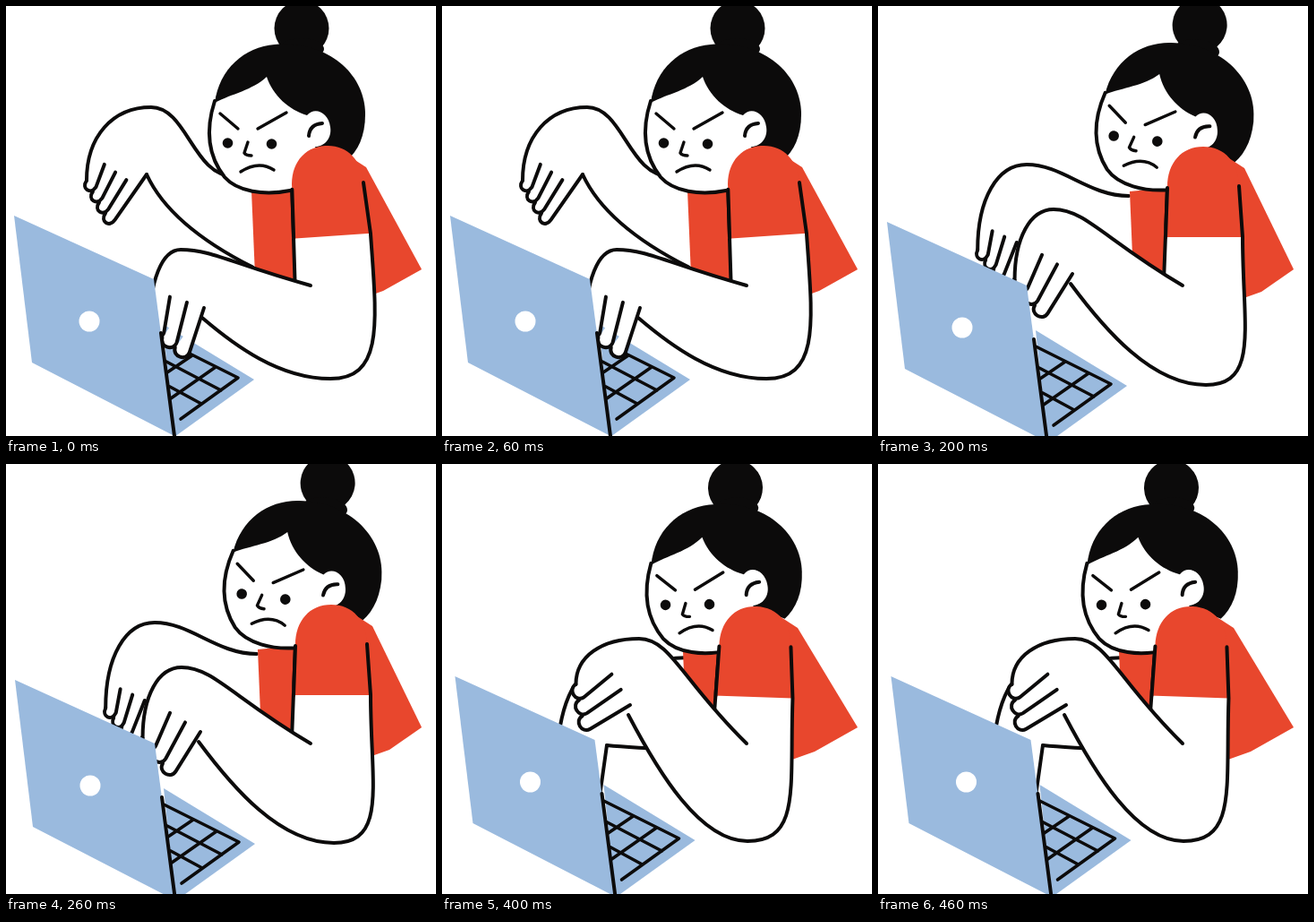
These frames come from a looping animation (480x480 px, 0.5 s). An HTML page with a canvas:

```html
<!DOCTYPE html>
<html lang="en">
<head>
<meta charset="utf-8">
<title>Angry typing</title>
<style>
html, body { margin: 0; width: 100%; height: 100%; overflow: hidden; background: #fff; }
canvas { display: block; width: 480px; height: 480px; }
</style>
</head>
<body>
<canvas id="stage" width="480" height="480"></canvas>
<script>
const ctx = document.getElementById('stage').getContext('2d');
const INK = '#0c0b0b', RED = '#e8472d', BLUE = '#9abade', WHITE = '#fff';
const STEP = 100;

// Joints of the figure; angles in degrees.
// wrist: top of the bent wrist, knuckle: base of the outer finger, aim: where fingers point.
const poses = [
  { laptop: [-4, -1], head: [271.5, 153.5], tilt: 0, bun: 0, shoulder: [356, 156], swing: -4, elbow: [362, 416],
    near: { wrist: [195, 272], knuckle: [221, 337], aim: 108 },
    far: { wrist: [162, 113], knuckle: [157, 188], aim: 125, root: [254, 190] } },
  { laptop: [0, 0], head: [278, 151], tilt: 0, bun: 0, shoulder: [359, 153], swing: -4, elbow: [372, 418],
    near: { wrist: [200, 251], knuckle: [219, 320], aim: 121 },
    far: { wrist: [166, 140], knuckle: [165, 214], aim: 120, root: [262, 198] } },
  { laptop: [-3, 6], head: [287, 148], tilt: 6, bun: -5, shoulder: [363, 157], swing: 0, elbow: [366, 423],
    near: { wrist: [196, 227], knuckle: [217, 299], aim: 122 },
    far: { wrist: [166, 177], knuckle: [176, 254], aim: 115, root: [280, 212] } },
  { laptop: [0, 2], head: [291.5, 145.5], tilt: 7.5, bun: 7, shoulder: [363, 157], swing: 6.5, elbow: [337, 415],
    near: { wrist: [219, 185], knuckle: [220, 260], aim: 142 },
    far: { wrist: [172, 216], knuckle: [184, 288], aim: 102, root: [290, 200] } },
  { laptop: [1.5, 2], head: [273.5, 157], tilt: -2, bun: 0, shoulder: [351, 159], swing: 2, elbow: [341, 421],
    near: { wrist: [220, 195], knuckle: [210, 269], aim: 149 },
    far: { wrist: [168, 235], knuckle: [184, 314], aim: 98, root: [276, 216] } }
];

const NEAR_HAND = { count: 3, gap: 20, inset: 0, reach: 60 };
const FAR_HAND = { count: 4, gap: 15, inset: 18, reach: 70 };
const TAPER = 0.85;

const add = ([x, y], dx, dy) => [x + dx, y + dy];

// Maps a point from a frame at `origin`, turned by `degrees`, to the stage.
function place(origin, degrees, x, y) {
  const a = degrees * Math.PI / 180, c = Math.cos(a), s = Math.sin(a);
  return add(origin, x * c - y * s, x * s + y * c);
}

function fill(path, color) {
  ctx.fillStyle = color;
  ctx.fill(path);
}

function ink(path, width = 4) {
  ctx.lineWidth = width;
  ctx.stroke(path);
}

const polygon = (points, color) => fill(new Path2D('M' + points.join('L') + 'Z'), color);
const line = (a, b) => new Path2D(`M${a}L${b}`);

function disc(x, y, rx, ry, color) {
  ctx.fillStyle = color;
  ctx.beginPath();
  ctx.ellipse(x, y, rx, ry, 0, 0, Math.PI * 2);
  ctx.fill();
}

function within(origin, degrees, paint) {
  ctx.save();
  ctx.translate(...origin);
  ctx.rotate(degrees * Math.PI / 180);
  paint();
  ctx.restore();
}

function drawKeyboard() {
  fill(new Path2D('M179 356L281 418L192 482Z'), BLUE);
  ink(new Path2D('M177 373L263 416L199 462M183 398L244 430M187 426L222 445M238 404L188 439M212 391L184 410'), 3.6);
}

function drawScreen() {
  fill(new Path2D('M13 235L169 306L192 481L33 399Z'), BLUE);
  ink(new Path2D('M177 366L192 481'));
  disc(97, 353, 11.5, 11.5, WHITE);
}

function drawHead(bunDrop) {
  ctx.translate(-271.5, -153.5);
  disc(330, 25 + bunDrop, 30.5, 31, INK);
  disc(330, 48, 25, 12, INK);
  fill(new Path2D('M233 108C238 70 266 46 300 43C358 38 401 75 401 121C401 145 393 162 380 173Z'), INK);
  const jaw = 'M233 106C222 140 226 168 244 191C258 207 288 212 317 206';
  fill(new Path2D(jaw + 'L345 190V157C356 157 364 147 362 135C360 118 344 112 336 122' +
    'C316 116 298 100 291 79C275 94 252 98 233 108'), WHITE);
  ink(new Path2D(jaw));
  ink(new Path2D('M239 120L259 137M281 137L313 119M270 152L266 164Q268 167 274 167M262 185Q282 172 299 183'), 3.4);
  ink(new Path2D('M353 131Q339 132 338 145'), 4);
  disc(247.5, 153, 5.8, 5.8, INK);
  disc(296.5, 154, 5.8, 5.8, INK);
}

// Fingers side by side, each a little shorter; the last one is open towards the wrist.
function drawFingers({ knuckle, aim }, { count, gap, inset, reach }) {
  within(knuckle, aim, () => {
    for (let i = 0; i < count; i++) {
      const tip = reach - 6 * i, side = gap * i, next = side + gap;
      const finger = new Path2D();
      finger.moveTo(i ? inset : 0, side);
      finger.lineTo(tip - 8, side * TAPER);
      finger.bezierCurveTo(tip + 3, side * TAPER, tip + 3, next * TAPER, tip - 8, next * TAPER);
      fill(finger, WHITE);
      ink(finger);
    }
  });
}

function handEdge({ knuckle, aim }, { count, gap, reach }) {
  return place(knuckle, aim, reach - 6 * count - 2, gap * count * TAPER);
}

// From the innermost finger up to the top of the wrist.
function wristCurve(hand, size) {
  const start = handEdge(hand, size), [x, y] = hand.wrist;
  return `${start}C${start[0]},${start[1] + 0.6 * (y - start[1])},${x - 0.6 * (x - start[0])},${y},${x},${y}`;
}

function drawFarArm(arm) {
  const { wrist, knuckle, root } = arm;
  drawFingers(arm, FAR_HAND);
  ink(new Path2D(`M${wristCurve(arm, FAR_HAND)}C${add(wrist, 40, 0)},${add(root, -45, 0)},${root}`));
  const elbowY = 250 + 0.22 * knuckle[1];
  const bend = add(knuckle, 26, 0.55 * (elbowY - knuckle[1]));
  ink(new Path2D(`M${knuckle}Q${bend},275,${elbowY}`));
}

function drawNearArm({ shoulder, swing, elbow, near }) {
  const at = (x, y) => place(shoulder, swing, x, y);
  const end = [340, 312];
  const heel = add(near.knuckle, -2, 11);
  const dx = elbow[0] - heel[0], dy = elbow[1] - heel[1];
  const under = `${at(40, 44)}L${at(44, 101)}C${at(44, 201)},${add(elbow, 60, 0)},${elbow}` +
    `C${add(elbow, -0.4 * dx, 0)},${add(heel, 0.25 * dx, 0.45 * dy)},${heel}`;
  const [wx, wy] = near.wrist;
  const over = `${wristCurve(near, NEAR_HAND)}C${wx + 35},${wy},` +
    `${add(end, 0.6 * (wx - end[0]), 0.6 * (wy - end[1]))},${end}`;

  fill(new Path2D(`M${under}L${near.knuckle}L${over}Z`), WHITE);
  drawFingers(near, NEAR_HAND);
  within(shoulder, swing, () =>
    fill(new Path2D('M-44 101L-40 45C-40 18 -24 0 0 0S40 18 40 45L44 101Z'), RED));
  ink(new Path2D(`M${under}M${over}`));
  ink(line(at(-40, 46), at(-42, 101)));
}

function drawChest({ shoulder, swing }) {
  const top = place(shoulder, swing, -40, 46), bottom = place(shoulder, swing, -44, 150);
  polygon([add(shoulder, -82, 50), top, bottom, add(shoulder, -78, 145)], RED);
  ink(line(top, bottom));
}

function drawBack({ shoulder }) {
  polygon([add(shoulder, 15, 4), add(shoulder, 46, 24), [464, 294], add(shoulder, 65, 162), add(shoulder, 20, 178)], RED);
}

function draw(pose) {
  ctx.fillStyle = WHITE;
  ctx.fillRect(0, 0, 480, 480);
  ctx.strokeStyle = INK;
  ctx.lineCap = ctx.lineJoin = 'round';
  within(pose.laptop, 0, drawKeyboard);
  drawFarArm(pose.far);
  drawChest(pose);
  within(pose.head, pose.tilt, () => drawHead(pose.bun));
  drawBack(pose);
  drawNearArm(pose);
  within(pose.laptop, 0, drawScreen);
}

const start = performance.now();
function tick() {
  const elapsed = Math.max(0, performance.now() - start);
  draw(poses[Math.floor(elapsed / STEP) % poses.length]);
  requestAnimationFrame(tick);
}
tick();
</script>
</body>
</html>
```
